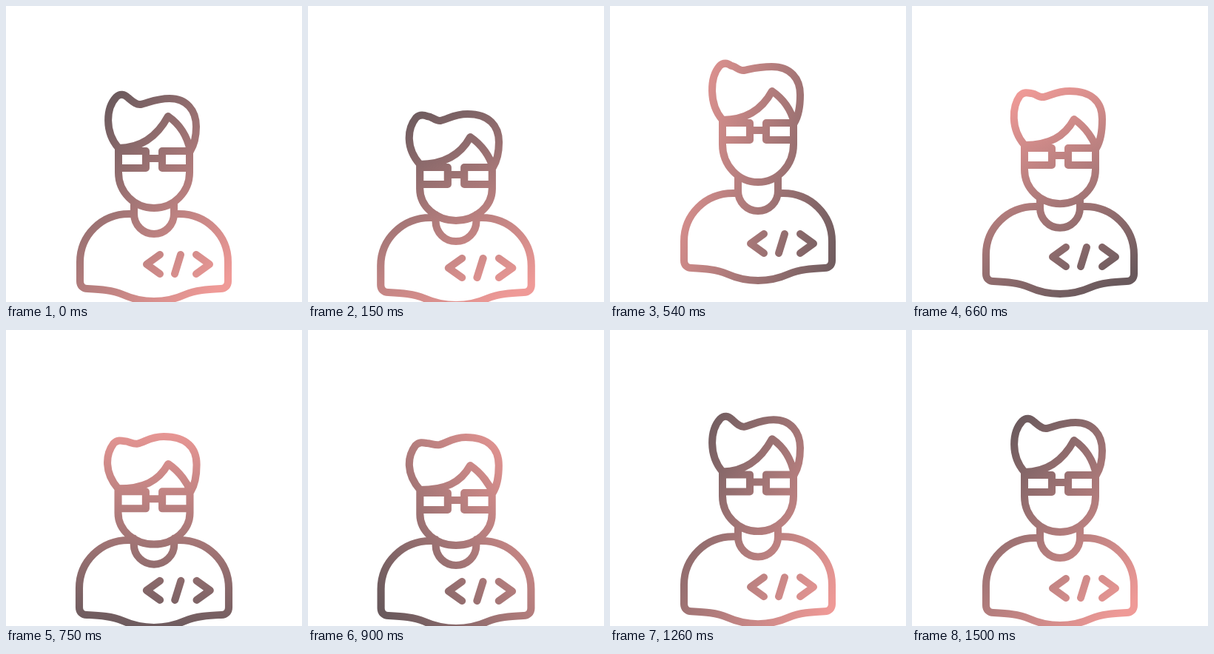
An HTML page with a canvas that plays this animation: 400 px wide and 400 px high, repeating every 3530 ms.

```html
<!DOCTYPE html>
<html lang="en">
<head>
<meta charset="utf-8">
<title>Developer avatar</title>
<style>
html, body { margin: 0; width: 100%; height: 100%; overflow: hidden; background: #fff; }
canvas { display: block; width: 100vmin; height: 100vmin; }
</style>
</head>
<body>
<canvas id="stage" width="400" height="400"></canvas>
<script>
const ctx = document.getElementById('stage').getContext('2d');
const LOOP = 3530, STEP = 30, ACTIVE = 1500;
const DARK = '#69595c', LIGHT = '#ef9a97';

// time, head y, body y, tuft y, dip y, crown y, fringe y, flatness
const POSES = [
  [0, 0, 0, 120, 133, 125, 149, 0],
  [150, 22, 5, 126, 133, 124, 155, 0.7],
  [300, -18, -23, 121, 125, 120, 157, 1],
  [450, -46, -35, 116, 126, 120, 153, 0.5],
  [540, -38, -28, 116, 125, 120, 153, 0.3],
  [660, -4, -10, 122, 127, 119, 157, 1],
  [810, 31, 7, 130, 133, 123, 159, 1],
  [900, 24, 4, 129, 131, 121, 159, 1],
  [1080, -1, -3, 116, 130, 120, 147, 0],
  [1500, 0, 0, 120, 133, 125, 149, 0]
];
// time, direction of the dark end in degrees
const TURN = [[0, 225], [300, 271], [540, 375], [660, 422], [900, 505], [1080, 548], [1500, 585]];

const mix = (a, b, k) => a + (b - a) * k;

// Monotone cubic interpolation of one column
function sample(rows, col, t) {
  const last = rows.length - 1;
  let i = 0;
  while (i < last - 1 && t >= rows[i + 1][0]) i++;
  const rate = j => (rows[j + 1][col] - rows[j][col]) / (rows[j + 1][0] - rows[j][0]);
  const slope = j => {
    if (j === 0 || j === last) return 0;
    const a = rate(j - 1), b = rate(j);
    return a * b <= 0 ? 0 : 2 * a * b / (a + b);
  };
  const a = rows[i], b = rows[i + 1], d = b[0] - a[0];
  const u = (t - a[0]) / d, v = 1 - u;
  return a[col] * v * v * (1 + 2 * u) + b[col] * u * u * (3 - 2 * u)
    + d * u * v * (slope(i) * v - slope(i + 1) * u);
}

function line(...p) {
  ctx.moveTo(p[0], p[1]);
  for (let i = 2; i < p.length; i += 2) ctx.lineTo(p[i], p[i + 1]);
}

function gradient(deg, cy) {
  const r = 145, a = deg * Math.PI / 180;
  const x = Math.cos(a) * r, y = Math.sin(a) * r;
  const g = ctx.createLinearGradient(200 + x, cy + y, 200 - x, cy - y);
  g.addColorStop(0, DARK);
  g.addColorStop(1, LIGHT);
  return g;
}

function torso(y, chin, collar) {
  ctx.moveTo(173, 281 + y);
  ctx.lineTo(166, 281 + y);
  ctx.bezierCurveTo(129, 281 + y, 100, 310 + y, 100, 346 + y);
  ctx.lineTo(100, 372 + y);
  ctx.bezierCurveTo(100, 378 + y, 104, 382 + y, 110, 382 + y);
  ctx.bezierCurveTo(128, 383 + y, 144, 384 + y, 158, 390 + y);
  ctx.bezierCurveTo(185, 402 + y, 215, 402 + y, 242, 390 + y);
  ctx.bezierCurveTo(256, 384 + y, 272, 383 + y, 290, 382 + y);
  ctx.bezierCurveTo(296, 382 + y, 300, 378 + y, 300, 372 + y);
  ctx.lineTo(300, 346 + y);
  ctx.bezierCurveTo(300, 310 + y, 271, 281 + y, 234, 281 + y);
  ctx.lineTo(227, 281 + y);

  line(173, 265 + chin, 173, 281 + collar);
  ctx.arc(200, 281 + collar, 27, Math.PI, 0, true);
  ctx.lineTo(227, 265 + chin);

  line(208, 336 + y, 190, 349 + y, 208, 362 + y);
  line(236, 336 + y, 228, 362 + y);
  line(257, 336 + y, 275, 349 + y, 257, 362 + y);
}

function face(y, chin) {
  ctx.rect(152, 196 + y, 37, 23);
  ctx.rect(211, 196 + y, 37, 23);
  line(189, 206 + y, 211, 206 + y);
  line(152, 192 + y, 152, 225 + y);
  ctx.ellipse(200, 225 + y, 48, 48 + chin - y, 0, Math.PI, 0, true);
  ctx.lineTo(248, 192 + y);
}

function hair(y, tuft, dip, crown, fringe, flat) {
  const left = mix(149, 146, flat), right = mix(165, 161, flat);
  const dipX = mix(182, 178, flat), crownX = mix(221, 213, flat);
  const tip = tuft + y, low = dip + y, top = crown + y, peak = fringe + y;
  const root = 192 + y;
  ctx.moveTo(152, root);
  ctx.bezierCurveTo(133, 170 + y, 135, tip + 18, left, tip + 3);
  ctx.bezierCurveTo(left + 5, tip - 2, right - 5, tip - 1, right, mix(tip + 4, tip, flat));
  ctx.bezierCurveTo(right + 5, mix(low - 5, tip, flat), dipX - 6, low + 1, dipX, low);
  ctx.bezierCurveTo(dipX + 10, low - 2, crownX - 18, top, crownX, top);
  ctx.bezierCurveTo(244, top, 257, top + 16, 257, top + 38);
  ctx.bezierCurveTo(257, 176 + y, 254, 188 + y, 249, 196 + y);

  ctx.moveTo(152, root);
  ctx.bezierCurveTo(185, root, 206, peak + 24, 219, peak);
  ctx.bezierCurveTo(235, peak + 11, 245, peak + 27, 249, 196 + y);
}

function draw(t) {
  const [head, body, tuft, dip, crown, fringe, flat] =
    [1, 2, 3, 4, 5, 6, 7].map(col => sample(POSES, col, t));
  const chin = mix(head, body, 0.3), collar = mix(body, head, 0.3);
  const wide = 1 + Math.max(0, body) * 0.0035;

  ctx.setTransform(1, 0, 0, 1, 0, 0);
  ctx.fillStyle = '#fff';
  ctx.fillRect(0, 0, 400, 400);
  ctx.setTransform(wide, 0, 0, 1, 200 * (1 - wide), 0);
  ctx.lineWidth = 10;
  ctx.lineCap = ctx.lineJoin = 'round';
  ctx.strokeStyle = gradient(sample(TURN, 1, t), 262 + body);
  ctx.beginPath();
  torso(body, chin, collar);
  face(head, chin);
  hair(head, tuft, dip, crown, fringe, flat);
  ctx.stroke();
}

const start = performance.now();
function tick() {
  const t = (performance.now() - start) % LOOP;
  draw(Math.min(ACTIVE, Math.floor(t / STEP) * STEP));
  requestAnimationFrame(tick);
}
tick();
</script>
</body>
</html>
```
